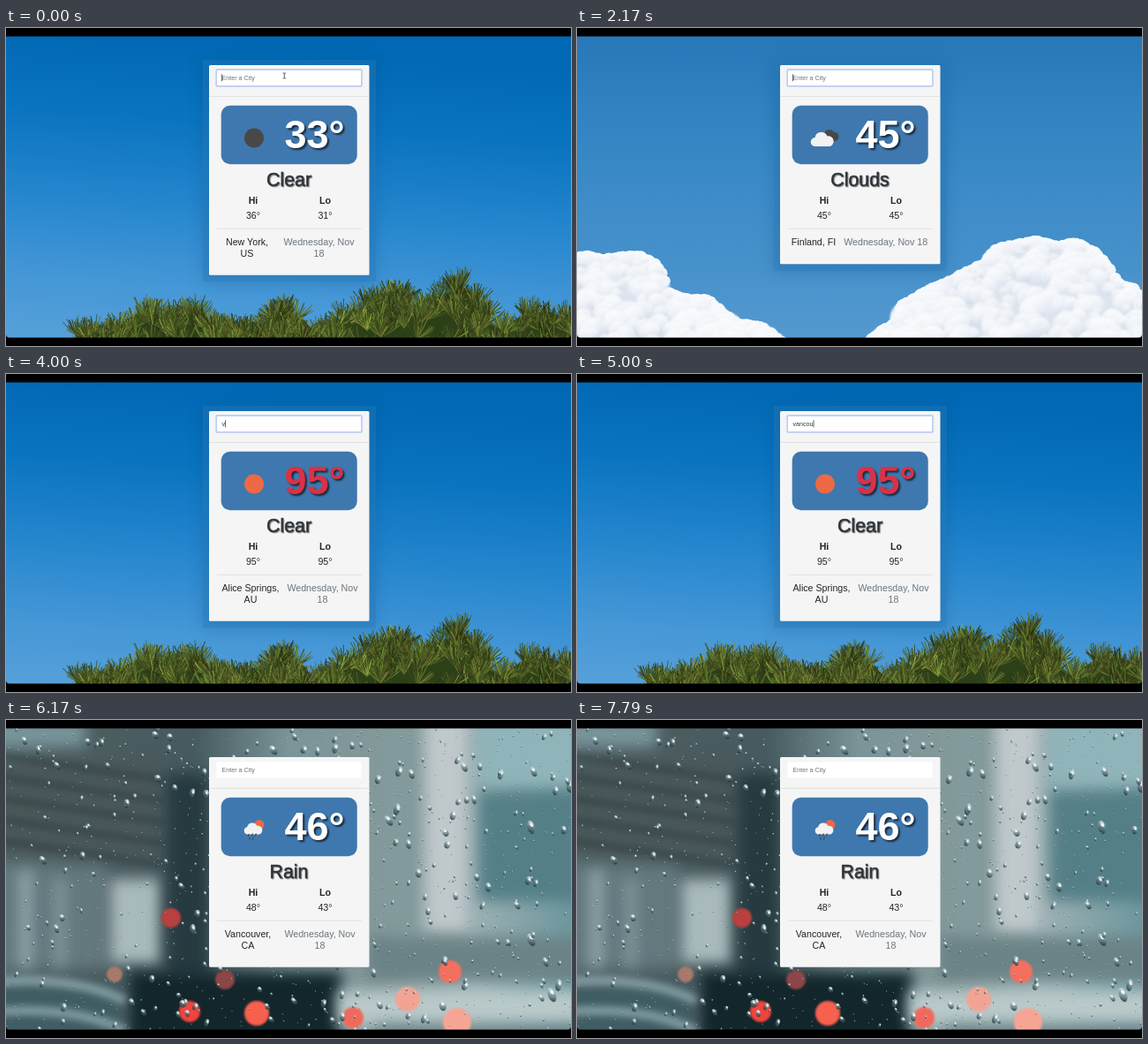
Write an HTML page with a canvas that moves like this. It is 640 by 360 pixels and loops after 8 s.

```html
<!DOCTYPE html>
<html lang="en">
<head>
<meta charset="utf-8">
<title>Weather search</title>
<style>
html, body { margin: 0; width: 100%; height: 100%; overflow: hidden; background: #000; }
canvas, svg { position: absolute; left: 0; top: 0; width: 640px; height: 360px; }
canvas { visibility: hidden; clip-path: inset(9.6px 0 9.6px 0 round 0 0 4px 4px); }
text { font-family: "Liberation Sans", Arial, sans-serif; font-size: 10.67px; fill: #212529; }
.mid { text-anchor: middle; }
.bold { font-weight: bold; }
.muted { fill: #6c757d; }
#query { font-size: 7.2px; }
#temp { font-size: 45px; font-weight: bold; text-shadow: 2px 2px 2px rgba(0,0,0,.65); }
#sky { font-size: 21.4px; fill: #343a40; stroke: #343a40; stroke-width: .6px; text-shadow: 1px 1px 1px rgba(0,0,0,.4); }
#glow { filter: blur(9px); }
</style>
</head>
<body>
<canvas id="clear" width="640" height="360"></canvas>
<canvas id="clouds" width="640" height="360"></canvas>
<canvas id="rain" width="640" height="360"></canvas>
<svg viewBox="0 0 640 360">
  <g id="halo">
    <rect id="glow" class="tall" x="222" y="38" width="197" fill="#023c70" opacity=".2"/>
    <rect id="panel" class="tall" x="223" y="36" width="196" fill="#2a7cb8" opacity=".4"/>
  </g>
  <rect id="card" x="230" y="42" width="181.5" rx="1.5" fill="#f5f5f5"/>
  <path d="M230 77.5H411.5M239 227.3H403" stroke="#dcdddd" stroke-width=".8"/>
  <rect x="238.5" y="47.5" width="164" height="18" rx="1" fill="#fff"/>
  <rect id="ring" x="238.2" y="47.2" width="164.8" height="18.6" rx="1" fill="none" stroke="#bccdf1" stroke-width="1.7"/>
  <text id="query" x="244.4" y="58.8"></text>
  <rect id="caret" y="52.3" width=".7" height="8" fill="#222"/>
  <path id="pointer" d="M313.6 51h1.1l.6.5.6-.5h1.1M315.3 51.5v5M313.6 57h1.1l.6-.5.6.5h1.1" fill="none" stroke="#333" stroke-width=".8"/>
  <rect x="243.7" y="87.7" width="154" height="66.6" rx="10" fill="#3f78ae"/>
  <circle id="disc" cx="281" cy="124.5" r="11"/>
  <g id="cloudIcon">
    <path d="M280 128a4.5 4.5 0 0 1 0-8a6 6 0 0 1 11-2a5 5 0 0 1 1 10z" fill="#484848"/>
    <path d="M270 134a5 5 0 0 1-.5-10a7.4 7.4 0 0 1 14-1.6a5.8 5.8 0 0 1 2.5 11.6z" fill="#f2f2f2"/>
  </g>
  <g id="rainIcon">
    <circle cx="286.8" cy="118.6" r="5.6" fill="#ec6a45"/>
    <path d="M273.5 129.600a4.200 4.200 0 0 1-.4-8.300a6 6 0 0 1 11.300-1.500a5 5 0 0 1 2 9.800z" fill="#f2f2f2"/>
    <path d="M275.5 129l-1.500 3M279.500 128.500l-1.500 3M283.500 128.500l-1.500 3M276.500 133l-1 2.500M280.500 132.500l-1.300 3" stroke="#484848" stroke-width="1.200"/>
  </g>
  <text id="temp" x="315.500" y="136.300"></text>
  <text id="sky" class="mid" x="320.500" y="178.600"></text>
  <text class="mid bold" x="280" y="199.300">Hi</text>
  <text class="mid bold" x="361.500" y="199.300">Lo</text>
  <text id="hi" class="mid" x="280" y="215.700"></text>
  <text id="lo" class="mid" x="361.500" y="215.700"></text>
  <text id="city1" class="mid" y="246.300"></text>
  <text id="city2" class="mid" y="258.800"></text>
  <text id="date1" class="mid muted" y="246.300"></text>
  <text id="date2" class="mid muted" y="258.800"></text>
</svg>
<script>
const $ = id => document.getElementById(id);
const TAU = Math.PI * 2;

function seeded(seed) {
  return () => {
    seed = (seed * 1664525 + 1013904223) >>> 0;
    return seed / 4294967296;
  };
}

// Height of a skyline given as x,y pairs.
function ridge(points) {
  return x => {
    for (let i = 2; i < points.length; i += 2) {
      if (x <= points[i]) {
        const k = (x - points[i - 2]) / (points[i] - points[i - 2]);
        return points[i - 1] + k * (points[i + 1] - points[i - 1]);
      }
    }
    return points[points.length - 1];
  };
}

function gradient(c, stops, x = 0, y = 360) {
  const g = c.createLinearGradient(0, 0, x, y);
  stops.forEach((s, i) => g.addColorStop(i / (stops.length - 1), s));
  c.fillStyle = g;
  c.fillRect(0, 0, 640, 360);
}

function fillBelow(c, line, from, to, drop, color) {
  c.fillStyle = color;
  c.beginPath();
  c.moveTo(from, 360);
  for (let x = from; x <= to; x += 3) c.lineTo(x, line(x) + drop);
  c.lineTo(to, 360);
  c.fill();
}

function disc(c, x, y, r, color) {
  c.fillStyle = color;
  c.beginPath();
  c.arc(x, y, r, 0, TAU);
  c.fill();
}

function drawClear(c) {
  const rnd = seeded(11);
  gradient(c, ["#0068b4", "#0b74c0", "#2385cd", "#4396d6", "#5aa2da"], -25);
  const top = ridge([75, 348, 80, 328, 95, 326, 112, 336, 120, 330, 135, 312, 150, 305, 170, 306,
    185, 310, 200, 297, 222, 300, 232, 322, 245, 325, 270, 324, 285, 322, 300, 308, 320, 304,
    340, 314, 348, 330, 370, 325, 385, 305, 410, 296, 425, 285, 445, 283, 465, 300, 480, 298,
    495, 285, 515, 272, 535, 290, 550, 318, 565, 320, 590, 304, 615, 303, 640, 315]);
  fillBelow(c, top, 78, 640, 18, "#2c4018");
  const tufts = [];
  for (let i = 0; i < 230; i++) {
    const x = 80 + rnd() * 565;
    const edge = top(Math.min(x, 640));
    tufts.push([x, edge + 19 + rnd() * rnd() * (362 - edge)]);
  }
  tufts.sort((a, b) => a[1] - b[1]);
  c.lineCap = "round";
  for (const [x, y] of tufts) {
    const lean = (rnd() - .5) * .9;
    const tone = rnd() * 10;
    for (let n = 0; n < 30; n++) {
      const a = lean + (rnd() - .5) * 2.1;
      const len = 10 + rnd() * 14;
      const light = 10 + tone + rnd() * rnd() * 36;
      c.strokeStyle = `hsl(${64 + rnd() * 22},44%,${light}%)`;
      c.lineWidth = .5 + rnd() * .6;
      c.beginPath();
      c.moveTo(x, y);
      c.quadraticCurveTo(x + Math.sin(a) * len * .6, y - Math.cos(a) * len * .5,
        x + Math.sin(a) * len, y - Math.cos(a) * len);
      c.stroke();
    }
  }
}

// A billow lit from above: white crown, blue-grey base.
function billow(c, x, y, r, base) {
  const g = c.createLinearGradient(x - r * .3, y - r, x + r * .3, y + r);
  g.addColorStop(0, "#fcfdfe");
  g.addColorStop(.45, "#f0f3f8");
  g.addColorStop(1, base);
  disc(c, x, y, r, g);
}

function drawBank(c, line, from, to, rnd) {
  fillBelow(c, line, from, to, 5, "#dde4ee");
  for (let x = from; x < to; x += 4) {
    const r = 3 + rnd() * 6;
    billow(c, x, line(x) + r * .8, r, "#e6ebf3");
  }
  const billows = [];
  for (let i = 0; i < (to - from) * 1.1; i++) {
    const x = from + rnd() * (to - from);
    const r = 4 + rnd() * 10;
    billows.push([x, line(x) + r + rnd() * (358 - line(x)), r]);
  }
  billows.sort((a, b) => a[1] - b[1]);
  c.filter = "blur(1.2px)";
  c.globalAlpha = .75;
  for (const [x, y, r] of billows) billow(c, x, y, r, rnd() < .5 ? "#c9d4e3" : "#dde4ee");
  c.globalAlpha = 1;
  c.filter = "none";
}

function drawClouds(c) {
  const rnd = seeded(5);
  gradient(c, ["#2676b8", "#3182c2", "#3c8bc8", "#4791cb", "#559ad0"]);
  drawBank(c, ridge([0, 255, 10, 253, 30, 257, 50, 254, 70, 253, 88, 262, 98, 275, 104, 295,
    125, 302, 150, 303, 165, 318, 185, 330, 210, 333, 230, 348, 236, 354]), 0, 236, rnd);
  drawBank(c, ridge([330, 350, 345, 338, 360, 330, 367, 310, 385, 300, 400, 290, 420, 283,
    440, 272, 460, 262, 475, 245, 500, 240, 520, 236, 545, 242, 565, 238, 588, 250,
    600, 265, 615, 285, 630, 290, 640, 300]), 330, 640, rnd);
}

function drawDrop(c, x, y, r, rnd) {
  c.save();
  c.translate(x, y);
  c.rotate((rnd() - .6) * 1.1);
  c.scale(.9, 1.1 + rnd() * .6);
  const g = c.createLinearGradient(-r * .4, r, r * .4, -r);
  g.addColorStop(0, "rgba(18,36,42,.85)");
  g.addColorStop(.45, "rgba(90,120,126,.6)");
  g.addColorStop(1, "rgba(228,240,241,.95)");
  disc(c, 0, 0, r, g);
  c.fillStyle = "rgba(248,253,253,.9)";
  c.beginPath();
  c.ellipse(r * .25, -r * .35, r * .45, r * .3, .4, 0, TAU);
  c.fill();
  c.restore();
}

function drawRain(c) {
  const rnd = seeded(23);
  gradient(c, ["#566a6e", "#4c5d60", "#465a5f", "#7a9498", "#84999a", "#9bb0b3", "#6d979e"], 640, 0);
  const block = (x, y, w, h, color) => {
    c.fillStyle = color;
    c.fillRect(x, y, w, h);
  };
  c.filter = "blur(8px)";
  block(-20, 0, 110, 30, "#78959b");
  block(-20, 45, 195, 110, "#4a585a");
  block(-20, 165, 135, 115, "#63797e");
  block(15, 170, 14, 110, "#93a8ac");
  block(55, 180, 12, 100, "#85999d");
  block(118, 180, 56, 95, "#a9babd");
  block(182, 60, 48, 230, "#263a40");
  block(420, 0, 48, 240, "#829a9b");
  block(475, -10, 48, 250, "#bfc8cb");
  block(535, -10, 120, 90, "#8fb4ba");
  block(535, 80, 120, 125, "#557f87");
  block(410, 245, 250, 50, "#6b8386");
  block(140, 285, 240, 80, "#12262b");
  block(-20, 300, 150, 70, "#3f5d64");
  block(375, 306, 290, 40, "#b9c9ca");
  block(420, 345, 240, 30, "#6e8589");
  c.filter = "blur(4px)";
  c.lineWidth = 5;
  c.strokeStyle = "#303f42";
  for (let y = 40; y < 150; y += 24) {
    c.beginPath();
    c.moveTo(-10, y);
    c.lineTo(180, y + 28);
    c.stroke();
  }
  c.lineWidth = 9;
  c.strokeStyle = "#8ba5aa";
  for (const y of [296, 330]) {
    c.beginPath();
    c.moveTo(-10, y);
    c.quadraticCurveTo(80, y - 6, 135, y + 22);
    c.stroke();
  }
  const lamps = [
    [187, 224, 11, "#b9403f"], [208, 330, 12, "#f0443c"], [284, 332, 14, "#f8604e"],
    [503, 285, 13, "#f3705e"], [393, 337, 12, "#ef6a5c"], [455, 316, 14, "#f2a394"],
    [248, 294, 11, "#8c4647"], [123, 288, 9, "#a8796b"], [511, 342, 16, "#f6a594"]
  ];
  c.filter = "blur(1px)";
  for (const lamp of lamps) disc(c, ...lamp);
  c.filter = "none";
  for (let i = 0; i < 1150; i++) {
    const x = 640 * Math.pow(rnd(), .85);
    const size = rnd();
    drawDrop(c, x, 8 + rnd() * 345, .6 + size ** 5 * (2.8 + x / 400), rnd);
  }
}

drawClear($("clear").getContext("2d"));
drawClouds($("clouds").getContext("2d"));
drawRain($("rain").getContext("2d"));

const LOOP = 8000;
const scenes = [
  { at: 0, bg: "clear", sky: "Clear", temp: 33, hi: 36, lo: 31, city: ["New York,", "US"], x: [273, 354.5],
    disc: "#484848", word: "finland", from: 170, pace: 200, hideCaret: 1580 },
  { at: 1990, bg: "clouds", sky: "Clouds", temp: 45, hi: 45, lo: 45, city: ["Finland, FI", ""], x: [268, 349.7],
    word: "alice springs", from: 2380, pace: 100 },
  { at: 4000, bg: "clear", sky: "Clear", temp: 95, hi: 95, lo: 95, city: ["Alice Springs,", "AU"], x: [277, 358.5],
    disc: "#ec6a45", hot: true, word: "vancouver", from: 4000, pace: 200 },
  { at: 6170, bg: "rain", sky: "Rain", temp: 46, hi: 48, lo: 43, city: ["Vancouver,", "CA"], x: [274, 355.5],
    word: "", from: LOOP, pace: 200, blurred: true }
];

const show = (id, on) => { $(id).style.visibility = on ? "visible" : "hidden"; };
const put = (id, text, x) => {
  $(id).textContent = text;
  if (x) $(id).setAttribute("x", x);
};

function setScene(s) {
  for (const id of ["clear", "clouds", "rain"]) show(id, id === s.bg);
  const oneLine = !s.city[1];
  const bottom = oneLine ? 267.3 : 279.7;
  $("card").setAttribute("height", bottom - 42);
  document.querySelectorAll(".tall").forEach(r => r.setAttribute("height", bottom - 28.5));
  show("halo", s.bg !== "rain");
  show("ring", !s.blurred);
  show("disc", s.disc);
  show("cloudIcon", s.bg === "clouds");
  show("rainIcon", s.bg === "rain");
  $("disc").style.fill = s.disc || "none";
  $("temp").style.fill = s.hot ? "#dc3045" : "#fff";
  put("temp", s.temp + "°");
  put("sky", s.sky);
  put("hi", s.hi + "°");
  put("lo", s.lo + "°");
  put("city1", s.city[0], s.x[0]);
  put("city2", s.city[1], s.x[0]);
  put("date1", oneLine ? "Wednesday, Nov 18" : "Wednesday, Nov", s.x[1]);
  put("date2", oneLine ? "" : "18", s.x[1]);
}

let current;
function frame() {
  const t = performance.now() % LOOP;
  const s = scenes.filter(v => v.at <= t).pop();
  if (s !== current) setScene(current = s);
  const count = Math.max(0, Math.floor((t - s.from) / s.pace) + 1);
  const typed = s.word.slice(0, count);
  put("query", typed || "Enter a City");
  $("query").style.fill = typed ? "#343a40" : "#6c757d";
  const end = typed ? $("query").getComputedTextLength() + .3 : 0;
  $("caret").setAttribute("x", 244.2 + end);
  show("caret", !s.blurred && !(t >= s.hideCaret));
  show("pointer", t < 170);
  requestAnimationFrame(frame);
}
frame();
</script>
</body>
</html>
```
